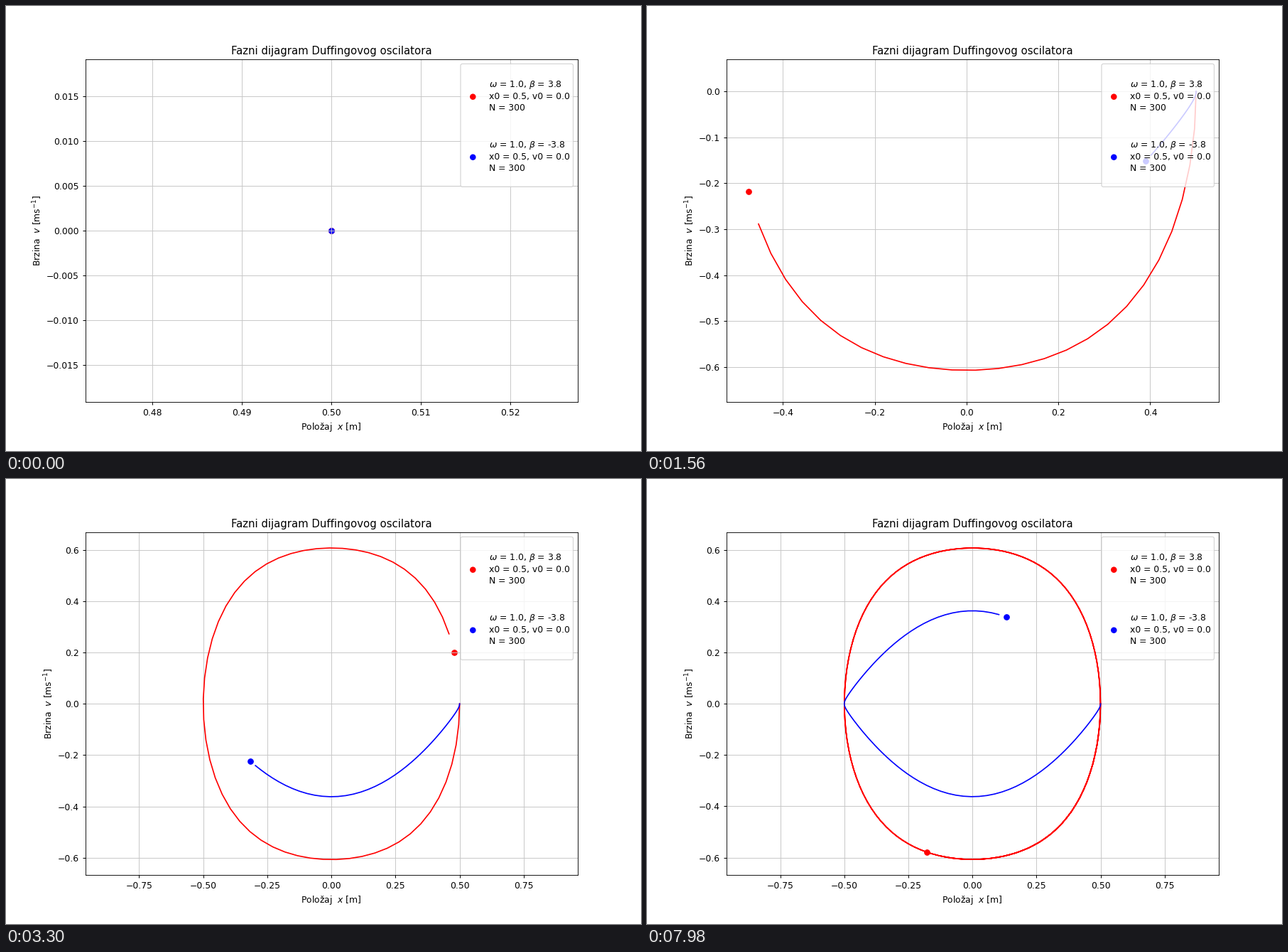
A matplotlib script for the animation above (8 s loop, 894 by 626 pixels).

```python
import numpy as np
import matplotlib.pyplot as plt
from matplotlib.animation import FuncAnimation
from matplotlib.patches import Circle, FancyBboxPatch
from matplotlib.transforms import Affine2D

W, H, DPI = 894, 626, 89.4
FRAMES, INTERVAL, STEP = 200, 40, 60

OMEGA, X0, V0, N = 1.0, 0.5, 0.0, 300
BETAS = np.array([3.8, -3.8])
COLORS = ["red", "blue"]
DT = 8 * np.pi / N


def slope(s):
    x, v = s
    return np.array([v, -OMEGA**2 * x - BETAS * x**3])


def solve():
    """Runge-Kutta orbits, shape (N, 2, 2): step, (x, v), oscillator."""
    s = np.array([[X0, X0], [V0, V0]])
    out = [s]
    for _ in range(N - 1):
        k1 = slope(s)
        k2 = slope(s + DT / 2 * k1)
        k3 = slope(s + DT / 2 * k2)
        k4 = slope(s + DT * k3)
        s = s + DT / 6 * (k1 + 2 * k2 + 2 * k3 + k4)
        out.append(s)
    return np.array(out)


orbits = solve()

plt.rcParams.update({"font.family": "DejaVu Sans", "axes.linewidth": 0.72,
                     "grid.color": "#c6c6c6", "grid.linewidth": 0.75})
# the tiny surplus keeps the pixel size from rounding down
fig = plt.figure(figsize=((W + 1e-6) / DPI, (H + 1e-6) / DPI), dpi=DPI)
ax = fig.add_axes([0.125, 0.11, 0.775, 0.77])
ax.set_title("Fazni dijagram Duffingovog oscilatora")
ax.set_xlabel("Položaj  $x$ [m]")
ax.set_ylabel("Brzina  $v$ [ms$^{-1}$]", labelpad=3)
ax.grid(True)
ax.axis("equal")

lines = [ax.plot([], [], color=c, lw=1.35)[0] for c in COLORS]
dots = [ax.scatter([X0], [V0], color=c, lw=1) for c in COLORS]


def draw_legend():
    # pixel coordinates with the origin at the top left
    px = Affine2D().scale(1 / W, -1 / H).translate(0, 1) + fig.transFigure
    fig.add_artist(FancyBboxPatch(
        (640, 81.4), 158.5, 173, boxstyle="round,pad=0,rounding_size=2.5",
        fc="white", ec="0.8", lw=1, alpha=0.8, transform=px, zorder=5))
    for i, (beta, color) in enumerate(zip(BETAS, COLORS)):
        top = 85 * i
        fig.add_artist(Circle((657.3, 127.7 + top), 4.25, fc=color, lw=0,
                              transform=px, zorder=6))
        rows = [rf"$\omega$ = {OMEGA}, $\beta$ = {beta}",
                f"x0 = {X0}, v0 = {V0}",
                f"N = {N}"]
        for y, row in zip((114, 131, 147), rows):
            fig.text(679.6, y + top, row, transform=px, va="baseline",
                     fontsize=10, zorder=7)


def update(i):
    k = (i * INTERVAL + INTERVAL // 2) // STEP
    for j in range(2):
        path = orbits[:k + 1, :, j]
        lines[j].set_data(path[:-1, 0], path[:-1, 1])
        dots[j].set_offsets(path[-1:])
    seen = orbits[:k + 1].transpose(0, 2, 1).reshape(-1, 2)
    ax.dataLim.update_from_data_xy(seen, ignore=True)
    ax.autoscale_view()
    return lines + dots


draw_legend()
anim = FuncAnimation(fig, update, frames=FRAMES, interval=INTERVAL,
                     init_func=lambda: update(0), repeat=True, repeat_delay=0)
plt.show()
```
